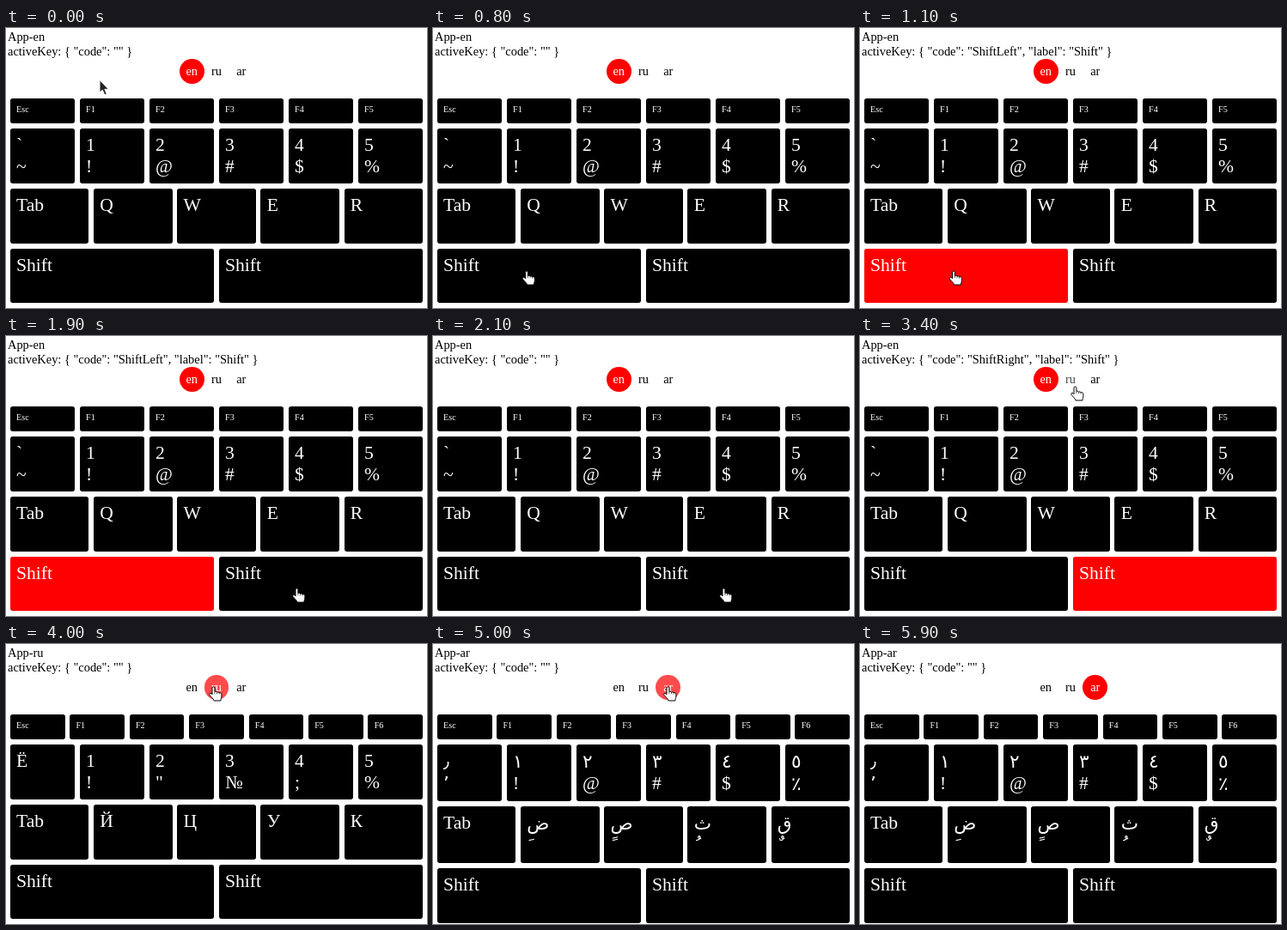
Write an HTML page that moves like this. It is 490 px wide and 326 px high and loops after 6500 ms.

```html
<!DOCTYPE html>
<html lang="en">
<head>
<meta charset="utf-8">
<title>On-screen keyboard</title>
<style>
  html, body { margin: 0; width: 100%; height: 100%; overflow: hidden; background: #fff; }
  body { position: relative; font: 14.4px "Liberation Serif", "DejaVu Sans", serif; color: #000; }
  .info { position: absolute; left: 2px; top: 2px; line-height: 17px; white-space: pre; }
  .langs { position: absolute; left: 201.8px; top: 36px; display: flex; }
  .langs span {
    width: 28.8px; height: 28.8px; line-height: 28.8px;
    border-radius: 50%; text-align: center;
  }
  .langs .on { background: #f00; color: #fff; }
  .langs .hover { opacity: .7; }
  .key {
    position: absolute; box-sizing: border-box; padding: 7px 7.2px;
    border-radius: 2.88px; background: #000; color: #fff;
    font-size: 21.6px; white-space: pre;
  }
  .key.small { font-size: 10.08px; }
  .key.on { background: #f00; }
  .cursor { position: absolute; left: 0; top: 0; width: 20px; height: 22px; overflow: visible; }
</style>
</head>
<body>
<div class="info"><div id="app"></div><div id="active"></div></div>
<div class="langs" id="langs"><span>en</span><span>ru</span><span>ar</span></div>
<div id="board"></div>
<svg class="cursor" id="cursor">
  <path id="arrow" d="M.5 .5V15.2L3.8 12.2 6.3 18 8.8 16.9 6.4 11.3H11Z"
    fill="#222" stroke="#fff" stroke-linejoin="round"/>
  <g id="hand" stroke="#000" stroke-linejoin="round">
    <path fill="#fff" d="M4 2.3C4 .4 6.9 .4 6.9 2.3V6.5C7.8 5.9 9.3 6.2 9.5 7.2 10.4 6.6 11.8 6.9 12.1 7.9 13.2 7.4 14.9 7.9 14.9 9.6V12C14.9 13.8 13.9 14.5 13.9 17H6C5.8 15 2.6 12.6 1 10.4 .1 8.9 1.8 7.6 3 8.7L4 9.7Z"/>
    <path fill="none" stroke-width=".6" d="M6.9 6.5V9M9.5 7.2V9.3M12.1 7.9V9.6"/>
  </g>
</svg>
<script>
const LOOP = 6500;
const $ = id => document.getElementById(id);
const names = ['en', 'ru', 'ar'];

// Each key is "main" or "main shift"; keys are separated by "|"
const fn = n => ['Esc', ...Array.from({ length: n }, (_, i) => 'F' + (i + 1))].join('|');
const layouts = {
  en: [fn(5), '` ~|1 !|2 @|3 #|4 $|5 %', 'Tab|Q|W|E|R', 'Shift|Shift'],
  ru: [fn(6), 'Ё|1 !|2 "|3 №|4 ;|5 %', 'Tab|Й|Ц|У|К', 'Shift|Shift'],
  ar: [fn(6), '\u066B \u066C|\u0661 !|\u0662 @|\u0663 #|\u0664 $|\u0665 \u066A',
    'Tab|\u0636 \u064E|\u0635 \u064B|\u062B \u064F|\u0642 \u064C', 'Shift|Shift']
};
const rowBox = {
  en: [[82, 29], [117, 64], [187, 64], [257, 63]],
  ar: [[82, 29], [117, 66], [189, 66], [261, 64]]
};
rowBox.ru = rowBox.en;

// [start, value]: each value holds until the next start
const langTrack = [[0, 'en'], [4000, 'ru'], [5000, 'ar']];
const keyTrack = [[0, ''], [1100, 'ShiftLeft'], [2100, ''], [2600, 'ShiftRight'], [3600, '']];
const A = 'arrow', H = 'hand';
const cursorTrack = [
  [0, [A, 108.5, 60]], [200, [A, 108, 65]], [300, [H, 107, 90]], [400, [H, 109, 103]],
  [600, [H, 107, 150]], [700, [H, 102, 250]], [800, [H, 103.5, 282]],
  [1600, [H, 130, 284]], [1700, [H, 220, 290]], [1800, [H, 310, 293]], [1900, [H, 333, 293]],
  [2800, [H, 334, 282]], [2900, [H, 336, 270]],
  [3100, [H, 330, 240]], [3200, [H, 305, 160]], [3300, [H, 270, 90]],
  [3400, [H, 245, 58]], [3500, [H, 236, 49]],
  [4400, [H, 240, 50]], [4500, [H, 252, 51]], [4600, [H, 263, 50]], [4700, [H, 268, 49]],
  [5700, [A, 205, 33]], [5800, [A, 130, 15]], [5900, ['none', 0, 0]]
];
const at = (track, t) => track.findLast(([start]) => start <= t)[1];

function build(lang) {
  const board = $('board');
  board.textContent = '';
  layouts[lang].forEach((row, r) => {
    const keys = row.split('|');
    const pitch = 486 / keys.length;
    const [top, height] = rowBox[lang][r];
    keys.forEach((label, i) => {
      const key = document.createElement('div');
      key.className = r ? 'key' : 'key small';
      key.style.cssText = `left:${2 + i * pitch + 2.88}px;top:${top}px;` +
        `width:${pitch - 5.76}px;height:${height}px`;
      for (const text of label.split(' ')) {
        const line = document.createElement('div');
        line.textContent = text;
        key.append(line);
      }
      if (r === 3) key.dataset.code = i ? 'ShiftRight' : 'ShiftLeft';
      board.append(key);
    });
  });
}

let shown;
function draw() {
  const t = performance.now() % LOOP;
  const lang = at(langTrack, t);
  const code = at(keyTrack, t);
  const [shape, x, y] = at(cursorTrack, t);

  if (lang !== shown) build(shown = lang);
  $('app').textContent = 'App-' + lang;
  $('active').textContent = `activeKey: { "code": "${code}"${code && ', "label": "Shift"'} }`;
  for (const key of document.querySelectorAll('[data-code]'))
    key.classList.toggle('on', key.dataset.code === code);

  const over = shape === H && y > 35 && y < 64 ? Math.floor((x + 5.4 - 201.8) / 28.8) : -1;
  [...$('langs').children].forEach((el, i) => {
    el.classList.toggle('on', names[i] === lang);
    el.classList.toggle('hover', i === over);
  });

  $('cursor').style.transform = `translate(${x}px, ${y}px)`;
  for (const id of [A, H]) $(id).style.display = id === shape ? '' : 'none';
  requestAnimationFrame(draw);
}
draw();
</script>
</body>
</html>
```
